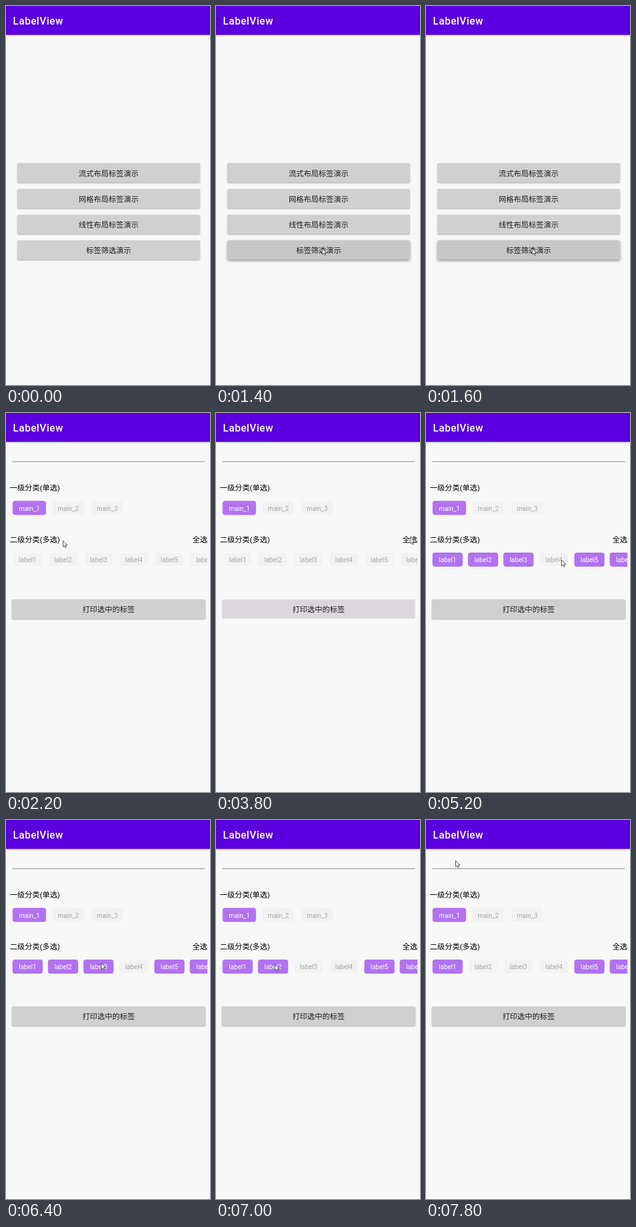
Write an HTML page that moves like this. It is 320 px wide and 592 px high and loops after 8000 ms.

```html
<!DOCTYPE html>
<html lang="zh-CN">
<head>
<meta charset="utf-8">
<style>
html, body { margin: 0; width: 100%; height: 100%; overflow: hidden; background: #f8f8f8; }
svg { display: block; width: 320px; height: 592px; font: 11.75px Roboto, "Noto Sans CJK SC", "Noto Sans CJK", sans-serif; }
.title { font-size: 16px; font-weight: 500; letter-spacing: .55px; fill: #fff; }
.bar { fill: #5a00df; filter: drop-shadow(0 1px 1px #0005); }
.button { fill: #d0d0d0; filter: drop-shadow(0 1px 1px #0005); }
.button.pressed { fill: #c7c7c7; filter: drop-shadow(0 2px 2px #0006); }
.button.flat { fill: #dcd7dd; filter: none; }
.mid { text-anchor: middle; fill: #202020; }
.chip rect { fill: #f2f2f2; }
.chip text { font-size: 10.2px; fill: #a6a6a6; }
.chip.on rect { fill: #b272f0; }
.chip.on text { fill: #fff; }
</style>
</head>
<body>
<svg viewBox="0 0 320 592">
  <defs><clipPath id="row"><rect y="200" width="316" height="60"/></clipPath></defs>
  <g id="menu"></g>
  <g id="filter">
    <path d="M10 76H312" stroke="#8c8c8c"/>
    <text x="6" y="121.3">一级分类(单选)</text>
    <text x="6" y="201.8">二级分类(多选)</text>
    <text x="316" y="201.8" text-anchor="end">全选</text>
    <g id="mains"></g>
    <g id="labels" clip-path="url(#row)"></g>
  </g>
  <rect class="bar" width="320" height="45"/>
  <text class="title" x="11" y="28.7">LabelView</text>
  <path id="cursor" d="M.5.5V10L2.7 8 4.3 11.5 5.8 10.8 4.3 7.5H7.3Z" fill="#fff" stroke="#444" stroke-width=".9"/>
</svg>
<script>
const LOOP = 8000, STEP = 200;
const $ = id => document.getElementById(id);

function add(parent, tag, attrs, text = '') {
  const el = document.createElementNS('http://www.w3.org/2000/svg', tag);
  for (const k in attrs) el.setAttribute(k, attrs[k]);
  el.textContent = text;
  return parent.appendChild(el);
}

function button(parent, x, y, width, text) {
  const box = add(parent, 'rect', { class: 'button', x, y, width, height: 30, rx: 1.5 });
  add(parent, 'text', { class: 'mid', x: x + width / 2, y: y + 20 }, text);
  return box;
}

function chip(parent, x, y, width, text) {
  const g = add(parent, 'g', { class: 'chip' });
  const box = add(g, 'rect', { rx: 4 });
  add(g, 'text', { x: x + 10, y: y + 15.2 }, text);
  return on => {
    const inset = on ? 0 : 2;
    g.classList.toggle('on', on);
    box.setAttribute('x', x + inset);
    box.setAttribute('y', y + inset / 2);
    box.setAttribute('width', width - 2 * inset);
    box.setAttribute('height', 22 - inset);
  };
}

const items = ['流式布局标签演示', '网格布局标签演示', '线性布局标签演示', '标签筛选演示']
  .map((text, i) => button($('menu'), 18, 245.5 + 40.2 * i, 286, text));
const print = button($('filter'), 9.5, 291.3, 303, '打印选中的标签');
[1, 2, 3].forEach(n => chip($('mains'), 10.3 + 61 * (n - 1), 137.3, 52.5, 'main_' + n)(n === 1));
const labels = [1, 2, 3, 4, 5, 6].map(n =>
  chip($('labels'), 10.2 + 55.6 * (n - 1), 218, 47.4, 'label' + n));

// Times at which single labels are switched off again
const offAt = { 1: 7200, 2: 6600, 3: 5000 };

// Pointer stops: time, x, y
const stops = [
  [200, 130, 320], [400, 169, 367], [1000, 169, 367], [1200, 166, 378], [1800, 166, 378],
  [2200, 89, 199], [2400, 89, 199], [3400, 304, 194], [4000, 304, 194], [4600, 212, 229],
  [5200, 212, 229], [5800, 149, 223], [6600, 149, 223], [7000, 92, 225], [7200, 92, 225],
  [7800, 46, 63], [LOOP, 46, 63]
];

function pointer(t) {
  const i = Math.max(1, stops.findIndex(s => s[0] >= t));
  const [t0, x0, y0] = stops[i - 1], [t1, x1, y1] = stops[i];
  const k = (t - t0) / (t1 - t0);
  return [x0 + (x1 - x0) * k, y0 + (y1 - y0) * k];
}

function draw(now) {
  const t = Math.floor(now % LOOP / STEP) * STEP;
  const shown = Math.min(1, Math.max(0, (t - 1600) / 400));
  $('menu').style.opacity = 1 - shown;
  $('filter').style.opacity = shown;
  items[3].classList.toggle('pressed', t >= 1200);
  print.classList.toggle('flat', t >= 2400 && t < 4000);
  labels.forEach((set, i) => set(t >= 4000 && t < (offAt[i] || LOOP)));
  $('cursor').style.display = t < STEP ? 'none' : '';
  if (t >= STEP) $('cursor').setAttribute('transform', `translate(${pointer(t)})`);
  requestAnimationFrame(draw);
}
draw(0);
</script>
</body>
</html>
```
